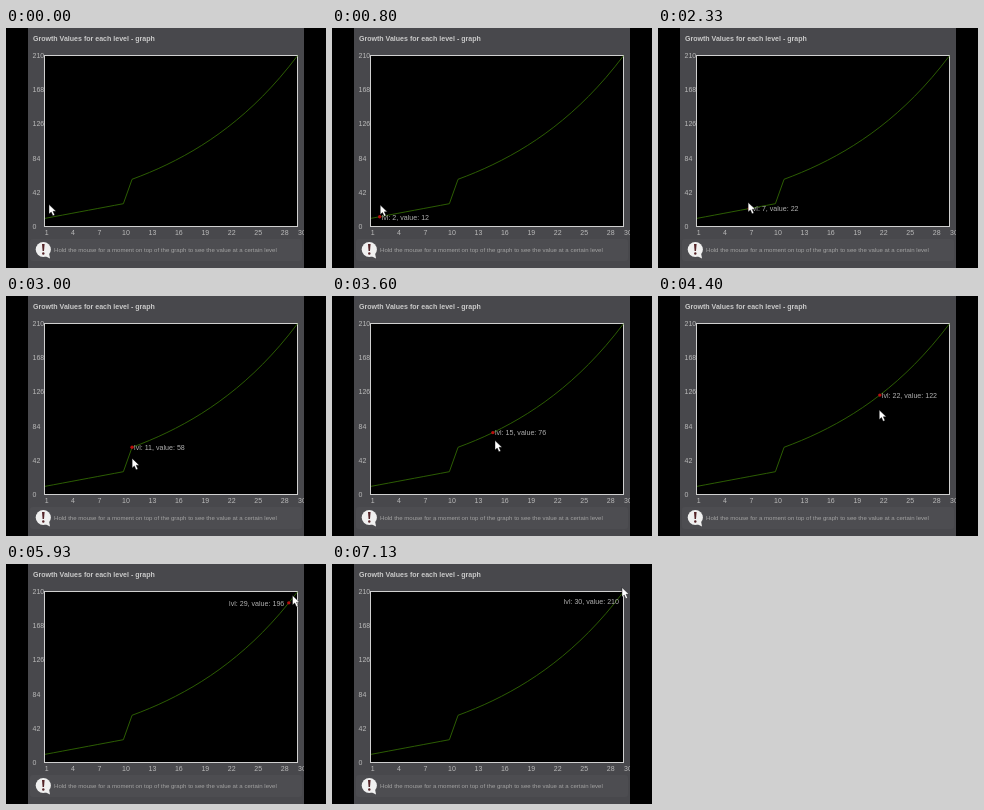
An HTML page for the animation above (7190 ms loop, 320 px wide and 240 px high).

```html
<!DOCTYPE html>
<html lang="en">
<head>
<meta charset="utf-8">
<title>Growth values</title>
<style>
  html, body { margin: 0; width: 100%; height: 100%; overflow: hidden; background: #000; }
  svg { display: block; width: 100vw; height: 100vh; }
  text { font: 7px "Liberation Sans", Arial, sans-serif; fill: #bababa; }
  .title { font-size: 7.06px; font-weight: bold; fill: #cacaca; }
  .hint { font-size: 6.07px; fill: #a2a2a2; }
  #label { font-size: 7.1px; fill: #b0b0b0; }
</style>
</head>
<body>
<svg viewBox="0 0 320 240">
  <defs><clipPath id="panel"><rect x="22" width="276" height="240"/></clipPath></defs>
  <g clip-path="url(#panel)">
    <rect x="22" width="276" height="240" fill="#48484c"/>
    <text class="title" x="27" y="13">Growth Values for each level - graph</text>
    <rect x="38.5" y="27.5" width="253" height="171" fill="#000" stroke="#d0d0d0"/>
    <g id="axes"></g>
    <polyline id="curve" fill="none" stroke="#326804" stroke-width=".9"/>
    <rect x="24" y="211" width="272" height="22" rx="3" fill="#4d4d51"/>
    <circle cx="37.3" cy="221.5" r="7.6" fill="#f0f0f0"/>
    <path d="M39 228 L44 230.5 L43 225 Z" fill="#f0f0f0"/>
    <path d="M36 216 H38.6 L38 223 H36.6 Z" fill="#552428"/>
    <circle cx="37.3" cy="225.5" r="1.2" fill="#552428"/>
    <text class="hint" x="48" y="224.2">Hold the mouse for a moment on top of the graph to see the value at a certain level</text>
    <g id="tip">
      <circle id="dot" r="1.7" fill="#b80e0e"/>
      <text id="label"></text>
    </g>
  </g>
  <path id="cursor" d="M0 0 V9.5 L2.2 7.5 L3.9 11.3 L5.7 10.5 L4 6.8 H7 Z" fill="#fff" stroke="#000" stroke-width=".4"/>
</svg>
<script>
const LOOP = 7190, STEP = 1000 / 15, TIP_START = 700;
const LEFT = 39, RIGHT = 291.5, BOTTOM = 198.5, MAX = 210, LEVELS = 30;
const $ = id => document.getElementById(id);

const value = n => n <= 10 ? 8 + 2 * n : 58 * 1.07 ** (n - 11);
const px = n => LEFT + (n - 1) * (RIGHT - LEFT) / (LEVELS - 1);
const py = v => BOTTOM - v * 171 / MAX;

// time, x, y of the pointer tip
const path = [
  [0, 43, 176.5], [1530, 59, 177.5], [2330, 90, 174.5], [3600, 163, 144.5],
  [5200, 269, 75.5], [5930, 286.5, 31.5], [7130, 290, 23.5], [7190, 290, 23.5]
];

function slope(i, k) {
  if (i === 0 || i === path.length - 1) return 0;
  const d = j => (path[j + 1][k] - path[j][k]) / (path[j + 1][0] - path[j][0]);
  const a = d(i - 1), b = d(i);
  return a * b <= 0 ? 0 : 2 * a * b / (a + b);
}

// monotone cubic interpolation
function along(t, k) {
  let i = 0;
  while (i < path.length - 2 && t >= path[i + 1][0]) i++;
  const p = path[i], q = path[i + 1], span = q[0] - p[0];
  const u = (t - p[0]) / span, w = 1 - u;
  return p[k] * (1 + 2 * u) * w * w + q[k] * u * u * (3 - 2 * u)
    + span * u * w * (slope(i, k) * w - slope(i + 1, k) * u);
}

function place(el, attrs) {
  for (const key in attrs) el.setAttribute(key, attrs[key]);
}

function addText(x, y, str, anchor) {
  const el = document.createElementNS("http://www.w3.org/2000/svg", "text");
  place(el, { x, y, "text-anchor": anchor });
  el.textContent = str;
  $("axes").append(el);
}

for (let v = 0; v <= MAX; v += 42) addText(26.5, py(v) + 2.5, v, "start");
for (let i = 0; i < 10; i++) addText(40.6 + i * 26.45, 207, 1 + 3 * i, "middle");
addText(292, 207, LEVELS, "start");

$("curve").setAttribute("points",
  Array.from({ length: LEVELS }, (_, i) => [px(i + 1), py(value(i + 1))].join()).join(" "));

function draw(t) {
  const x = along(t, 1), y = along(t, 2);
  place($("cursor"), { transform: `translate(${x} ${y})` });

  const n = Math.max(1, Math.min(LEVELS, Math.round(1 + (x - LEFT) * (LEVELS - 1) / (RIGHT - LEFT))));
  const cx = px(n), cy = py(value(n)), flip = cx + 56 > RIGHT;
  place($("tip"), { visibility: t < TIP_START ? "hidden" : "visible" });
  place($("dot"), { cx, cy });
  place($("label"), {
    x: flip ? cx - 4.5 : cx + 2,
    y: Math.max(39.5, cy + 2.8),
    "text-anchor": flip ? "end" : "start"
  });
  $("label").textContent = `lvl: ${n}, value: ${Math.round(value(n))}`;
}

const start = performance.now();
function tick() {
  const t = (performance.now() - start) % LOOP;
  draw(Math.floor((t + 4) / STEP) * STEP);
  requestAnimationFrame(tick);
}
tick();
</script>
</body>
</html>
```
